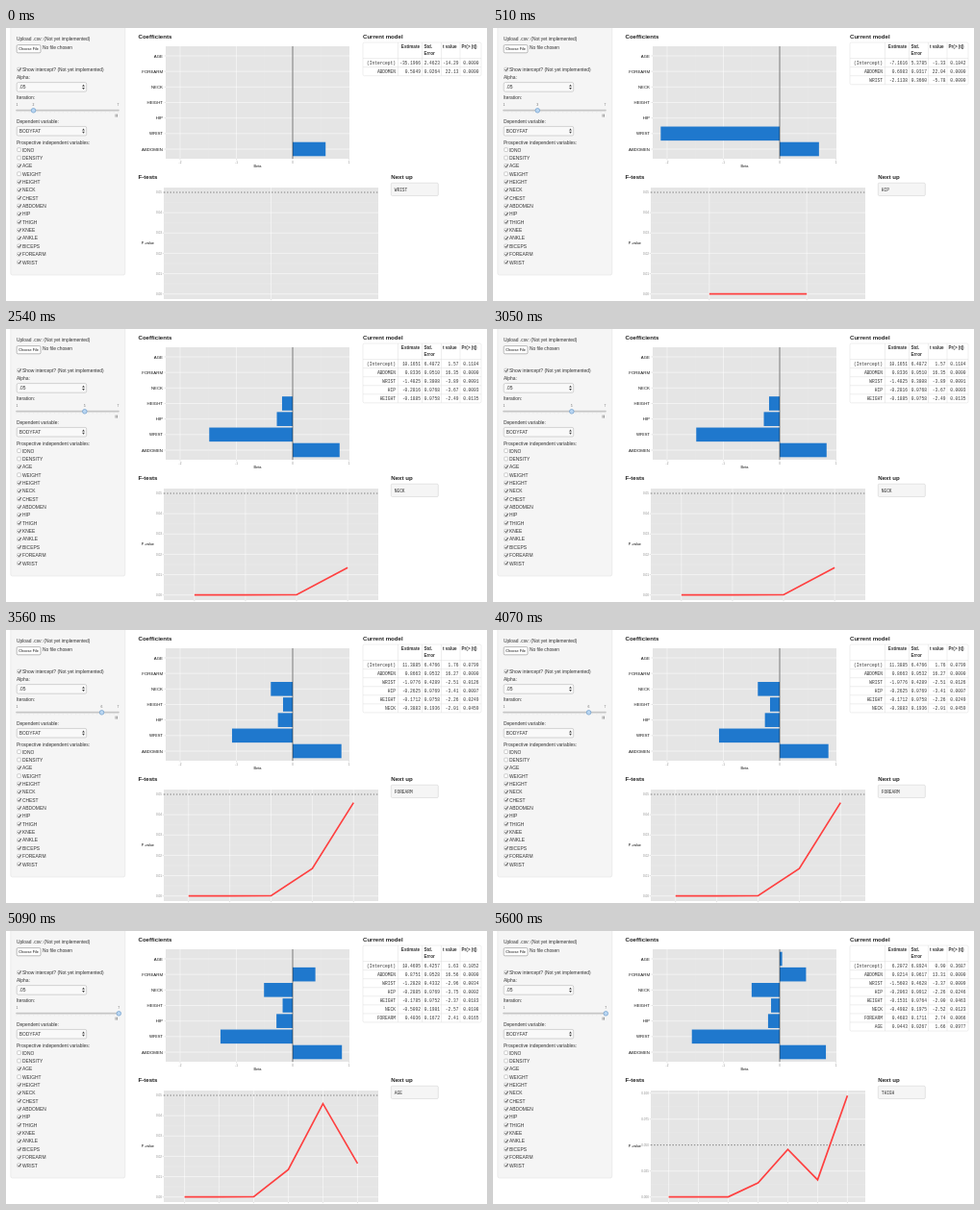
Write an HTML page that moves like this. It is 500 by 284 pixels and loops after 6220 ms.

```html
<!DOCTYPE html>
<html lang="en">
<head>
<meta charset="utf-8">
<title>Stepwise regression</title>
<style>
html, body { margin: 0; width: 100%; height: 100%; overflow: hidden; background: #fff; }
svg { display: block; width: 100vw; height: 100vh; }
text { font-family: "Liberation Sans", Arial, sans-serif; font-size: 4.9px; fill: #333; white-space: pre; }
.h { font-size: 6.1px; font-weight: bold; fill: #222; }
.th { font-size: 4.6px; font-weight: bold; }
.mono { font-family: "Liberation Mono", "Courier New", monospace; font-size: 4.55px; }
.cat { font-size: 4.35px; fill: #111; }
.axis { font-size: 3.9px; fill: #111; }
.tick { font-size: 3.1px; fill: #888; }
.num { font-size: 3.4px; fill: #666; }
</style>
</head>
<body>
<svg id="stage" viewBox="0 0 500 284" preserveAspectRatio="none"></svg>
<script>
const LOOP = 6220;
const STARTS = [0, 510, 1520, 2540, 3560, 4580, 5600];

// Variables in order of entry, and the one still waiting
const ORDER = ["ABDOMEN", "WRIST", "HIP", "HEIGHT", "NECK", "FOREARM", "AGE", "THIGH"];
const PVALS = [0, 0, 0.0001, 0.0135, 0.0459, 0.0165, 0.0977];

// Model rows per step: estimate, error, t, p
const MODELS = [
  ["-35.1966 2.4623 -14.29 0.0000", "0.5849 0.0264 22.13 0.0000"],
  ["-7.1616 5.3785 -1.33 0.1842", "0.6983 0.0317 22.04 0.0000", "-2.1138 0.3660 -5.78 0.0000"],
  ["2.4774 5.7426 0.43 0.6676", "0.8574 0.0506 16.95 0.0000", "-1.7777 0.3655 -4.86 0.0000",
   "-0.3054 0.0769 -3.97 0.0001"],
  ["10.1651 6.4872 1.57 0.1184", "0.8336 0.0510 16.35 0.0000", "-1.4825 0.3808 -3.89 0.0001",
   "-0.2816 0.0768 -3.67 0.0003", "-0.1885 0.0758 -2.49 0.0135"],
  ["11.3885 6.4766 1.76 0.0799", "0.8663 0.0532 16.27 0.0000", "-1.0776 0.4289 -2.51 0.0126",
   "-0.2625 0.0769 -3.41 0.0007", "-0.1712 0.0758 -2.26 0.0249", "-0.3883 0.1936 -2.01 0.0459"],
  ["10.4695 6.4257 1.63 0.1052", "0.8751 0.0528 16.56 0.0000", "-1.2828 0.4332 -2.96 0.0034",
   "-0.2885 0.0769 -3.75 0.0002", "-0.1785 0.0752 -2.37 0.0183", "-0.5092 0.1981 -2.57 0.0108",
   "0.4036 0.1672 2.41 0.0165"],
  ["6.2072 6.8924 0.90 0.3687", "0.8214 0.0617 13.31 0.0000", "-1.5603 0.4628 -3.37 0.0009",
   "-0.2063 0.0912 -2.26 0.0246", "-0.1531 0.0764 -2.00 0.0463", "-0.4982 0.1975 -2.52 0.0123",
   "0.4683 0.1711 2.74 0.0066", "0.0443 0.0267 1.66 0.0977"]
];

const text = (x, y, s, cls = "", anchor = "start") =>
  `<text x="${x}" y="${y}" class="${cls}" text-anchor="${anchor}">${s}</text>`;
const rect = (x, y, w, h, fill, stroke = "none", r = 0, sw = 0.5) =>
  `<rect x="${x}" y="${y}" width="${w}" height="${h}" rx="${r}" fill="${fill}" stroke="${stroke}" stroke-width="${sw}"/>`;
const line = (x1, y1, x2, y2, stroke, sw = 0.5, extra = "") =>
  `<path d="M${x1} ${y1}L${x2} ${y2}" stroke="${stroke}" stroke-width="${sw}" ${extra}/>`;

function checkbox(y, label, on) {
  const mark = on
    ? `<path d="M12.5 ${y}l1.1 1.3l2-3" fill="none" stroke="#222" stroke-width=".8"/>` : "";
  return rect(11.7, y - 1.9, 3.7, 3.7, "#fff", "#999", 0.6, 0.45) + mark + text(17, y + 1.8, label);
}

function select(y, label) {
  return rect(11.2, y, 72.5, 9.6, "#f9f9f9", "#aaa", 1.5) + text(13.7, y + 6.6, label) +
    `<path d="M79.1 ${y + 4.2}l1.4-2l1.4 2zM79.1 ${y + 5.4}l1.4 2l1.4-2z" fill="#444"/>`;
}

function sidebar() {
  const names = ["IDNO", "DENSITY", "AGE", "WEIGHT", "HEIGHT", "NECK", "CHEST", "ABDOMEN", "HIP",
    "THIGH", "KNEE", "ANKLE", "BICEPS", "FOREARM", "WRIST"];
  const off = ["IDNO", "DENSITY", "WEIGHT"];
  return rect(4.8, -4, 119, 261, "#f5f5f5", "#dcdcdc", 2) +
    text(11, 13.2, "Upload .csv: (Not yet implemented)") +
    rect(11.2, 17.6, 24.8, 8.2, "#fff", "#777", 1.2) +
    text(23.6, 23.4, "Choose File", "axis", "middle") +
    text(38, 21.9, "No file chosen") +
    checkbox(43.2, "Show intercept? (Not yet implemented)", true) +
    text(11, 53, "Alpha:") + select(56.6, ".05") +
    text(11, 74.4, "Iteration:") +
    text(11, 99.2, "Dependent variable:") + select(102.4, "BODYFAT") +
    text(11, 120.6, "Prospective independent variables:") +
    names.map((n, i) => checkbox(126.7 + i * 8.36, n, !off.includes(n))).join("");
}

function slider(step) {
  const n = Math.min(step + 2, 7);
  const x = 10.8 + (n - 1) * 17.75;
  let s = text(11.5, 81, "1", "num", "middle") + text(x, 81, n, "num", "middle");
  if (n < 7) s += text(116.5, 81, "7", "num", "middle");
  s += rect(10.5, 85, 107, 1.3, "#ccc", "#aaa", 0.6, 0.3);
  for (let i = 0; i < 25; i++) s += line(11 + i * 4.4, 87.2, 11 + i * 4.4, 88.2, "#d5d5d5", 0.3);
  s += `<circle cx="${x}" cy="85.8" r="2.3" fill="#b9d6f2" stroke="#6c9ccc" stroke-width=".7"/>`;
  return s + rect(113.6, 89.6, 0.8, 3, "#888") + rect(115.2, 89.6, 0.8, 3, "#888");
}

function coefs(step) {
  const zero = 298, unit = 58.5, top = 19, bottom = 136;
  const rowY = i => 126 - i * 16.17;
  let s = rect(166, top, 191, bottom - top, "#e5e5e5");
  for (let v = -2; v <= 1; v++) {
    const x = zero + v * unit;
    if (v < 1) s += line(x, top, x, bottom, "#fff", 0.5);
    if (v < 1) s += line(x + unit / 2, top, x + unit / 2, bottom, "#eee", 0.3);
    s += line(x, bottom, x, bottom + 1.2, "#999", 0.3) + text(x, 140.5, v, "tick", "middle");
  }
  for (let i = 0; i < 7; i++) {
    const y = rowY(i);
    s += line(166, y, 357, y, "#fff", 0.5) + line(164.7, y, 166, y, "#999", 0.3) +
      text(163, y + 1.6, ORDER[i], "cat", "end");
    if (i > step) continue;
    const w = parseFloat(MODELS[step][i + 1]) * unit;
    s += rect(Math.min(zero, zero + w), y - 7.3, Math.abs(w), 14.6, "#1f78cd");
  }
  return s + line(zero, top, zero, bottom, "#222", 0.6) + text(261.5, 144.6, "Beta", "axis", "middle");
}

function ftests(step) {
  const left = 164, right = 387, top = 166, bottom = 282, base = 276.7;
  const wide = step === 6;
  const gap = wide ? 0.025 : 0.01;
  const scale = wide ? 1080 : 2114;
  const n = step + 1, dx = (right - left) / (n + 0.2);
  const px = i => left + (0.6 + i) * dx;
  const py = p => base - p * scale;
  let s = rect(left, top, right - left, bottom - top, "#e5e5e5");
  for (let i = 0; i <= (wide ? 4 : 5); i++) {
    const y = py(i * gap);
    if (i) s += line(left, y + gap * scale / 2, right, y + gap * scale / 2, "#eee", 0.3);
    s += line(left, y, right, y, "#fff", 0.5) + line(left - 1.3, y, left, y, "#999", 0.3) +
      text(162, y + 1.1, (i * gap).toFixed(wide ? 3 : 2), "tick", "end");
  }
  for (let i = 0; i < n; i++) {
    s += line(px(i), top, px(i), bottom, "#fff", 0.5) + line(px(i), bottom, px(i), bottom + 1.2, "#999", 0.3);
  }
  s += line(left, py(0.05), right, py(0.05), "#333", 0.6, 'stroke-dasharray="1.6 1.6"');
  if (n > 1) {
    const pts = PVALS.slice(0, n).map((p, i) => px(i) + "," + py(p)).join(" ");
    s += `<polyline points="${pts}" fill="none" stroke="#ff4040" stroke-width="1.7"/>`;
  }
  return s + text(154, 225.4, "P-value", "axis", "end");
}

function table(step) {
  const rows = MODELS[step], ends = [431, 451, 470.5, 491.5];
  const edges = [371, 407.5, 432.6, 452.5, 472, 494];
  const rowH = 9.05, head = 31.6, bottom = head + rows.length * rowH;
  let s = rect(371, 15, 123, bottom - 15, "#fff", "#ddd", 1.5);
  edges.slice(1, -1).forEach(x => s += line(x, 15, x, bottom, "#ddd"));
  s += text(430, 21.3, "Estimate", "th", "end") + text(434.5, 21.3, "Std.", "th") +
    text(434.5, 28, "Error", "th") + text(454, 21.3, "t value", "th") +
    text(473.5, 21.3, "Pr(&gt; |t|)", "th");
  rows.forEach((row, i) => {
    const y = head + i * rowH;
    s += line(371, y, 494, y, "#ddd") +
      text(405, y + 6, i ? ORDER[i - 1] : "(Intercept)", "mono", "end");
    row.split(" ").forEach((v, k) => s += text(ends[k], y + 6, v, "mono", "end"));
  });
  return s;
}

const nextUp = step => rect(400.3, 161.2, 49, 13.3, "#f5f5f5", "#ccc", 1.2) +
  text(403.7, 169.6, ORDER[step + 1], "mono");

const headings = text(137.5, 10.6, "Coefficients", "h") + text(371, 10.6, "Current model", "h") +
  text(137.5, 157.1, "F-tests", "h") + text(400.3, 157.1, "Next up", "h");

const stage = document.getElementById("stage");
stage.innerHTML = sidebar() + headings + MODELS.map((_, i) =>
  `<g class="step" display="none">${slider(i) + coefs(i) + ftests(i) + table(i) + nextUp(i)}</g>`).join("");
const steps = [...stage.querySelectorAll(".step")];
let shown = -1;

function draw(now) {
  const t = now % LOOP;
  const step = STARTS.filter(s => s <= t).length - 1;
  if (step !== shown) {
    steps.forEach((g, i) => g.setAttribute("display", i === step ? "inline" : "none"));
    shown = step;
  }
}

const begin = performance.now();
function tick() {
  draw(performance.now() - begin);
  requestAnimationFrame(tick);
}
tick();
</script>
</body>
</html>
```
